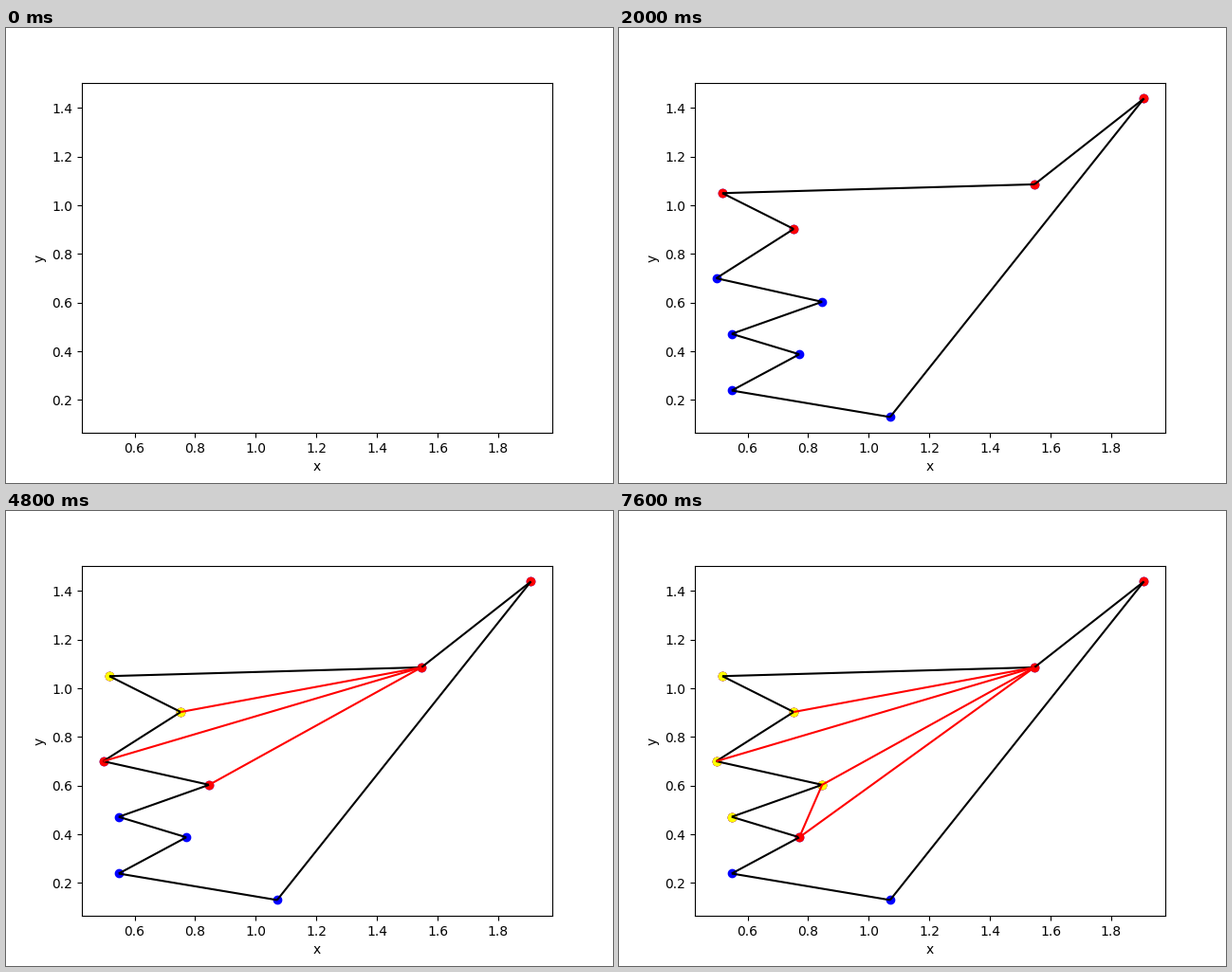
A matplotlib script for the animation above (8 s loop, 640 px wide and 480 px high).

```python
from itertools import islice

import matplotlib.pyplot as plt
from matplotlib.animation import FuncAnimation
from matplotlib.collections import LineCollection

FRAMES = 20
STEP_MS = 400

# Corners of a y-monotone polygon, from top to bottom along its left chain.
polygon = [
    (1.908, 1.43925), (1.547, 1.0866), (0.5168, 1.0504), (0.7524, 0.9031),
    (0.4967, 0.7006), (0.8461, 0.6038), (0.5476, 0.4721), (0.7709, 0.3881),
    (0.5477, 0.2391), (1.0704, 0.13025),
]

fig, ax = plt.subplots(figsize=(6.4, 4.8), dpi=100)
ax.set_xlabel("x")
ax.set_ylabel("y")


def dots(points, color):
    return ax.scatter(*zip(*points), c=color)


def lines(segments, color):
    return ax.add_collection(
        LineCollection(segments, colors=color, linewidths=1.5))


def sees(v, middle, far):
    """True if the diagonal from v to far runs inside the polygon."""
    (x, y), (mx, my), (fx, fy) = v, middle, far
    return (mx - x) * (fy - y) < (my - y) * (fx - x)


def triangulate():
    """Yield one new artist for each step of the sweep."""
    yield dots(polygon, "blue")
    yield lines(list(zip(polygon, polygon[1:] + polygon[:1])), "black")
    stack = polygon[:2]
    yield dots(stack, "red")
    for v in polygon[2:]:
        yield dots([v], "red")
        while len(stack) > 1 and sees(v, stack[-1], stack[-2]):
            yield lines([(v, stack[-2])], "red")
            yield dots([stack.pop()], "yellow")
        stack.append(v)


steps = list(islice(triangulate(), FRAMES - 1))


def update(frame):
    for i, artist in enumerate(steps):
        artist.set_visible(i < frame)
    return steps


anim = FuncAnimation(fig, update, frames=FRAMES, interval=STEP_MS,
                     init_func=lambda: update(0), repeat=True, repeat_delay=0)
plt.show()
```
